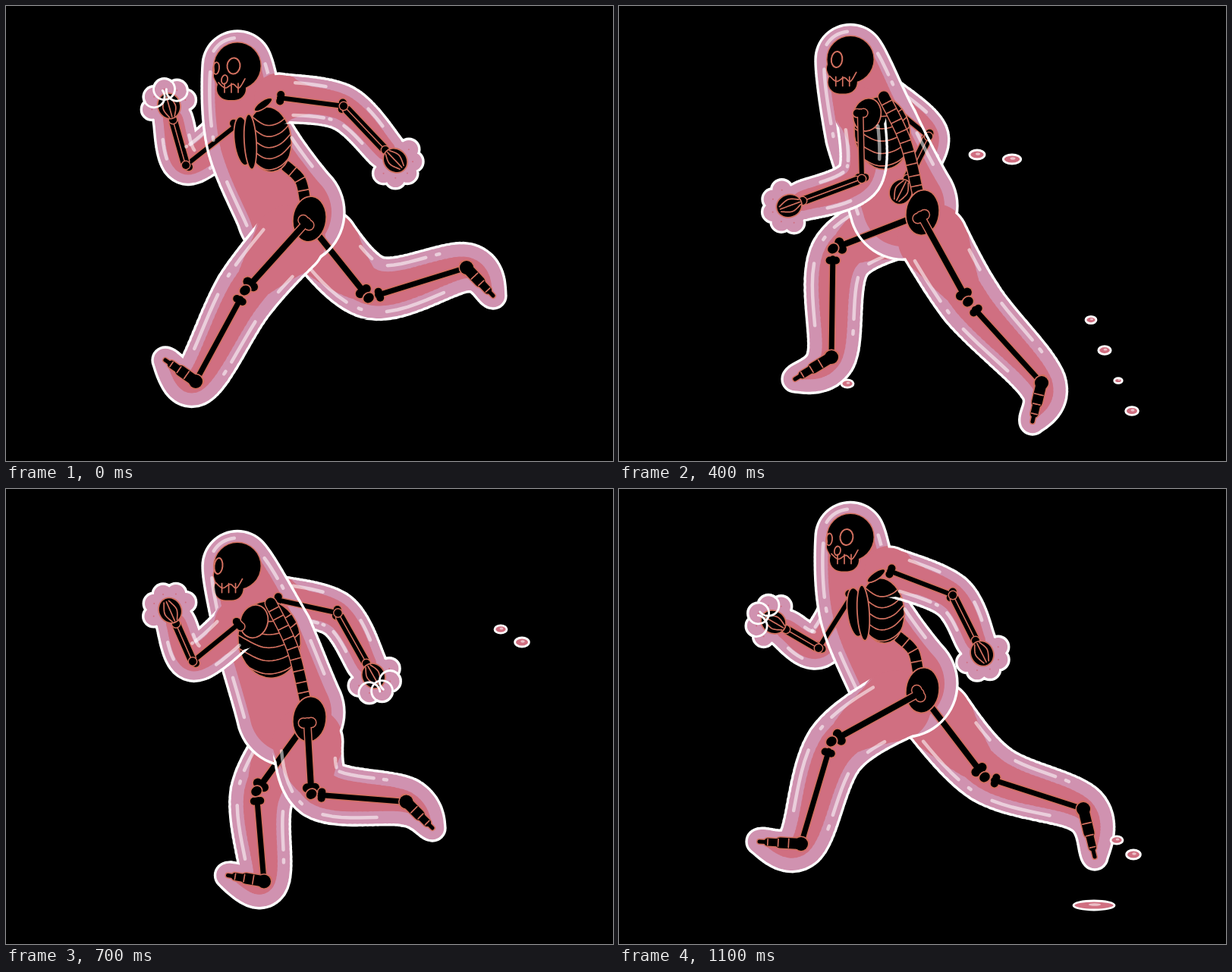
These frames come from a looping animation (800x600 px, 1200 ms). An HTML page with a canvas:

```html
<!DOCTYPE html>
<html lang="en">
<head>
<meta charset="utf-8">
<title>Jelly runner</title>
<style>
html, body { margin: 0; width: 100%; height: 100%; overflow: hidden; background: #000; }
canvas { display: block; }
</style>
</head>
<body>
<canvas id="stage" width="800" height="600"></canvas>
<script>
const STEP = 100, STEPS = 12;
const LILAC = '#d092b0', FLESH = '#d06f81', CORAL = '#d2705f', SHINE = 'rgba(255,255,255,.55)';
const stage = document.getElementById('stage').getContext('2d');
const lineCanvas = document.createElement('canvas');
lineCanvas.width = 800;
lineCanvas.height = 600;
const over = lineCanvas.getContext('2d');

// Stride keys: step, then joints. The far limbs run half a cycle later.
const strideLeg = [ // knee, ankle, toe
  [0, [315, 375], [250, 495], [210, 467]],
  [2, [345, 422], [430, 540], [375, 552]],
  [4, [460, 390], [557, 497], [545, 548]],
  [5, [482, 380], [612, 422], [627, 485]],
  [6, [478, 385], [607, 345], [642, 382]],
  [8, [327, 420], [448, 480], [482, 512]],
  [10, [282, 320], [280, 463], [232, 492]],
  [11, [280, 333], [240, 468], [185, 465]]
];
const strideArm = [ // elbow, wrist
  [0, [445, 132], [500, 190]],
  [2, [430, 195], [450, 270]],
  [4, [320, 228], [242, 257]],
  [5, [263, 210], [220, 185]],
  [6, [237, 210], [220, 150]],
  [8, [255, 245], [228, 205]],
  [10, [408, 172], [380, 228]],
  [11, [440, 140], [470, 200]]
];
// Rows of drops: step, first place, count, spacing, size.
const splashes = [
  [2, 492, 541, 4, 20, -28, 8],
  [4, 472, 196, 2, 46, 6, 10],
  [4, 622, 414, 4, 18, 40, 7],
  [4, 301, 498, 1, 0, 0, 8],
  [6, 592, 167, 2, 28, 17, 8],
  [10, 596, 445, 2, 22, 19, 8],
  [11, 626, 549, 1, 0, 0, 27]
];

const mix = (a, b, t) => a + (b - a) * t;
const lerp = (a, b, t) => [mix(a[0], b[0], t), mix(a[1], b[1], t)];
const shift = (p, dx, dy) => [p[0] + dx, p[1] + dy];

function joints(keys, step) {
  step %= STEPS;
  const i = keys.findLastIndex(key => key[0] <= step);
  const a = keys[i], b = keys[(i + 1) % keys.length];
  const t = (step - a[0]) / ((b[0] || STEPS) - a[0]);
  return a.slice(1).map((p, k) => lerp(p, b[k + 1], t));
}

function poseAt(step) {
  const turn = step / STEPS * 2 * Math.PI;
  const away = ((1 - Math.cos(turn)) / 2) ** 2;
  const bob = 22 * Math.sin(2 * turn) - 7 * Math.cos(2 * turn);
  const head = [305, 86 + bob], hips = [400, 288 + bob];
  const leg = at => [shift(hips, -3, 3), ...joints(strideLeg, at)];
  const arm = (at, swing) => {
    const [elbow, wrist] = joints(strideArm, at);
    const shoulder = [332 + 28 * swing, head[1] + 60 - 18 * swing];
    const reach = Math.hypot(wrist[0] - elbow[0], wrist[1] - elbow[1]);
    return [shoulder, elbow, wrist, lerp(elbow, wrist, 1 + 19 / reach)];
  };
  return {
    away, head, hips,
    nearLeg: leg(step), farLeg: leg(step + 6),
    nearArm: arm(step, Math.cos(turn)), farArm: arm(step + 6, -Math.cos(turn))
  };
}

// Point on a smooth curve through the list, pushed sideways by `aside`.
function along(list, u, aside = 0) {
  const i = Math.min(Math.floor(u), list.length - 2), t = u - i;
  const b = list[i], c = list[i + 1], a = list[i - 1] || b, d = list[i + 2] || c;
  const axis = k => {
    const m = (c[k] - a[k]) / 2, n = (d[k] - b[k]) / 2, e = c[k] - b[k];
    const q = 3 * e - 2 * m - n, r = m + n - 2 * e;
    return [b[k] + t * (m + t * (q + t * r)), m + t * (2 * q + 3 * t * r)];
  };
  const [x, dx] = axis(0), [y, dy] = axis(1), len = Math.hypot(dx, dy) || 1;
  return [x - dy / len * aside, y + dx / len * aside];
}

function trace(list, from = 0, to = list.length - 1, aside = () => 0) {
  const path = new Path2D(), count = Math.max(3, Math.ceil((to - from) * 12));
  for (let k = 0; k <= count; k++) {
    const u = mix(from, to, k / count);
    path.lineTo(...along(list, u, aside(u)));
  }
  return path;
}

function stroke(ctx, path, color, width) {
  ctx.strokeStyle = color;
  ctx.lineWidth = width;
  ctx.stroke(path);
}

function fill(ctx, path, color) {
  ctx.fillStyle = color;
  ctx.fill(path);
}

function oval(x, y, rx, ry, turn = 0) {
  const path = new Path2D();
  path.ellipse(x, y, rx, ry, turn, 0, 7);
  return path;
}

function radius(part, u) {
  const i = Math.min(Math.floor(u), part.radii.length - 2);
  return mix(part.radii[i], part.radii[i + 1], u - i);
}

// Union of discs along a part, each grown by `grow(u)`.
function body(part, grow) {
  const path = new Path2D(), end = part.spine.length - 1;
  const disc = ([x, y], r) => {
    if (r > 0) path.addPath(oval(x, y, r, r));
  };
  for (let u = part.start; u <= end + .001; u += .05) disc(along(part.spine, u), radius(part, u) + grow(u));
  for (const [p, r] of part.lumps) disc(p, r + grow(end));
  return path;
}

function legPart([hip, knee, ankle, toe]) {
  const bend = lerp(knee, lerp(hip, ankle, .5), .2);
  return {
    spine: [hip, bend, ankle, toe], radii: [48, 42, 32, 17], start: .35, open: .5, rim: 18, lumps: [],
    shine: [[1, .45, .85], [1, .95, .97], [1, 1.15, 1.65], [-1, .6, .8], [-1, 1.2, 1.6], [-1, 1.7, 1.73]]
  };
}

function armPart([shoulder, elbow, wrist, hand]) {
  const aim = Math.atan2(hand[1] - wrist[1], hand[0] - wrist[0]);
  const lumps = [-2, -1, 0, 1, 2].map(i => {
    const a = aim + i * .75;
    return [shift(hand, 23 * Math.cos(a), 23 * Math.sin(a)), 14];
  });
  return {
    spine: [shoulder, lerp(elbow, lerp(shoulder, wrist, .5), .08), wrist], radii: [32, 30, 26],
    start: 0, open: .5, rim: 13, lumps: [...lumps, [hand, 28]], aim,
    shine: [[1, .3, .75], [1, .85, .88], [1, 1.2, 1.6], [-1, .3, .7], [-1, 1.3, 1.6]]
  };
}

function torsoPart({ head, hips, away }) {
  const belly = shift(hips, -25, -9);
  return {
    spine: [head, shift(lerp(head, belly, .5), 22 * away - 18, 0), belly], radii: [46, 58 + 8 * away, 71],
    start: 0, open: 0, rim: 17, lumps: [],
    shine: [[1, .05, .75], [1, .86, .89], [1, 1.3, 1.8], [-1, .05, .4], [-1, .5, .53], [-1, 1.2, 1.6]]
  };
}

function jelly(part, torso) {
  const { spine, start, open, rim } = part;
  const inset = u => open ? mix(1, -rim, Math.min(1, (u - start) / open)) : -rim;
  fill(stage, body(part, () => 0), LILAC);
  fill(stage, body(part, inset), FLESH);

  fill(over, body(part, () => 1.7), '#fff');
  over.save();
  over.globalCompositeOperation = 'destination-out';
  over.fill(body(part, () => -1.7));
  if (open) {
    // Leave the root of the limb open where it grows out of the torso.
    const r = radius(part, start) + 3;
    over.clip(body(torso, () => -2));
    over.fill(oval(...along(spine, start), r, r));
  }
  over.restore();
  for (const [side, from, to] of part.shine) {
    stroke(over, trace(spine, from, to, u => side * (radius(part, u) - 10)), SHINE, 4.5);
  }
}

function fingers(part) {
  for (const [[x, y], r] of part.lumps.slice(1, 4)) {
    const path = new Path2D();
    path.arc(x, y, r, part.aim + 1.2, part.aim + 5.1);
    stroke(over, path, '#fff', 2.8);
  }
}

// A black shape built of round-ended rods, with one coral rim around it.
function ink(rods) {
  for (const [color, extra] of [[CORAL, 3], ['#000', 0]]) {
    for (const [a, b, width] of rods) {
      const path = new Path2D();
      path.moveTo(...a);
      path.lineTo(b[0] + .01, b[1]);
      stroke(stage, path, color, width + extra);
    }
  }
}

function solid(path) {
  fill(stage, path, '#000');
  stroke(stage, path, CORAL, 1.8);
}

const seam = (...list) => stroke(stage, trace(list), CORAL, 1.7);

function offset(a, b, t, side) {
  const len = Math.hypot(b[0] - a[0], b[1] - a[1]) || 1, p = lerp(a, b, t);
  return [p[0] - (b[1] - a[1]) / len * side, p[1] + (b[0] - a[0]) / len * side];
}

function bone(a, b, width, knob) {
  const rods = [[a, b, width]];
  for (const t of [.02, .98]) {
    for (const s of [-1, 1]) {
      const p = offset(a, b, t, s * knob * .42);
      rods.push([p, p, knob]);
    }
  }
  ink(rods);
}

function legBones([hip, knee, ankle, toe]) {
  bone(hip, lerp(knee, hip, .07), 8, 12);
  bone(lerp(knee, ankle, .09), ankle, 7, 10);
  solid(oval(...knee, 8, 7, -.6));
  const mid = lerp(ankle, toe, .5);
  ink([[ankle, ankle, 18], [ankle, mid, 14], [mid, lerp(mid, toe, .6), 10], [mid, toe, 5]]);
  for (const t of [.3, .55, .8]) seam(offset(ankle, toe, t, 7 - 4 * t), offset(ankle, toe, t, 4 * t - 7));
}

function armBones([shoulder, elbow, wrist, hand]) {
  bone(shoulder, elbow, 6, 10);
  for (const s of [-3, 3]) ink([[offset(elbow, wrist, .08, s), offset(elbow, wrist, .95, s), 5]]);
  ink([[elbow, elbow, 10], [wrist, wrist, 10]]);
  const aim = Math.atan2(hand[1] - wrist[1], hand[0] - wrist[0]);
  solid(oval(...hand, 17, 15, aim));
  const tip = lerp(wrist, hand, 1.8);
  for (const s of [-7, 0, 7]) seam(offset(wrist, tip, .12, s * .5), offset(wrist, tip, .5, s * 1.2), offset(wrist, tip, .92, s * .5));
}

function ribs([x, y], rx, ry, back) {
  const cage = oval(x, y, rx, ry, -.12);
  if (!back) solid(oval(x - 35, y + 2, 11, ry * .75, -.12));
  solid(cage);
  stage.save();
  stage.clip(cage);
  for (let k = -2; k < 3; k++) {
    const h = y + k * ry * .34;
    seam([x - rx, h - 6], [x - rx * .2, h + 10], [x + rx * .5, h + 6], [x + rx + 3, h - 12]);
  }
  stage.restore();
  if (back) solid(oval(x - 20, y - 24, 18, 22, .3));
  else {
    solid(oval(x - 25, y + 3, 8, ry * .85, -.06));
    solid(oval(x - 8, y - ry - 3, 14, 5, -.6));
  }
}

function vertebrae(top, bottom) {
  const list = [top, shift(lerp(top, bottom, .5), 6, -4), bottom], path = trace(list);
  stroke(stage, path, CORAL, 17);
  stroke(stage, path, '#000', 14);
  const gaps = Math.round(Math.hypot(bottom[0] - top[0], bottom[1] - top[1]) / 13);
  for (let k = 1; k < gaps; k++) {
    const u = 2 * k / gaps;
    seam(along(list, u, -7), along(list, u, 7));
  }
}

function skull([x, y], away) {
  const jx = x - 8 - 4 * away, jy = y + 30, ex = x - 5 - 23 * away;
  ink([[[x, y], [x, y], 61], [[jx - 4, jy], [jx + 4, jy], 30], [[x - 18, y + 12], [jx, jy], 26]]);
  stroke(stage, oval(ex, y, 8.5 - 4 * away ** 2, 10.5, .1), CORAL, 2);
  if (away < .3) {
    stroke(stage, oval(x - 28, y + 3, 4, 8, .1), CORAL, 1.8);
    stroke(stage, oval(ex - 12, y + 18, 4, 6, .2), CORAL, 1.8);
  }
  seam([jx - 17, jy - 8], [jx - 8, jy - 1], [jx + 2, jy - 6], [jx + 10, jy - 1], [jx + 18, jy - 13]);
  for (const dx of [-9, 0, 9]) seam([jx + dx, jy - 7], [jx + dx, jy + 5]);
}

function skeleton({ away, head, hips, nearLeg, farLeg, nearArm, farArm }) {
  const back = away > .2, cage = [347, head[1] + 97], low = shift(hips, -6, -26);
  legBones(farLeg);
  armBones(farArm);
  if (!back) vertebrae(shift(cage, 22, 35), low);
  ribs(cage, 29 + 14 * away, 43 + 9 * away, back);
  if (back) vertebrae(shift(cage, 2, -48), low);
  solid(oval(...hips, 22, 30, .12));
  skull(head, away);
  legBones(nearLeg);
  armBones(nearArm);
}

function drops(step) {
  for (const [born, x0, y0, count, dx, dy, size] of splashes) {
    const age = step - born;
    if (age < 0 || age > 1) continue;
    for (let i = 0; i < count; i++) {
      const x = x0 + i * dx + age * 60, y = y0 + i * dy + age * 18;
      const rx = size * (1 + .25 * Math.sin(i * 2.4)), ry = Math.min(6, rx * .65);
      if (x > 680) continue;
      const path = oval(x, y, rx, ry);
      fill(stage, path, FLESH);
      stroke(stage, path, '#fff', 2.8);
      fill(stage, oval(x + 1, y - 1, rx * .3, ry * .3), SHINE);
    }
  }
}

function draw(step) {
  const pose = poseAt(step), torso = torsoPart(pose), farArm = armPart(pose.farArm);
  fill(stage, oval(400, 300, 600, 600), '#000');
  over.clearRect(0, 0, 800, 600);
  jelly(legPart(pose.farLeg), torso);
  jelly(farArm, torso);
  fingers(farArm);
  jelly(torso, torso);
  const [x, y] = pose.head, glint = new Path2D();
  glint.arc(x, y, 37, 3.7, 4.6);
  stroke(over, glint, SHINE, 4.5);
  jelly(legPart(pose.nearLeg), torso);
  jelly(armPart(pose.nearArm), torso);
  skeleton(pose);
  stage.drawImage(lineCanvas, 0, 0);
  drops(step);
}

for (const ctx of [stage, over]) ctx.lineCap = ctx.lineJoin = 'round';

const start = performance.now();
let shown = -1;
function tick() {
  const step = Math.floor((performance.now() - start) / STEP) % STEPS;
  if (step !== shown) draw(shown = step);
  requestAnimationFrame(tick);
}
tick();
</script>
</body>
</html>
```
